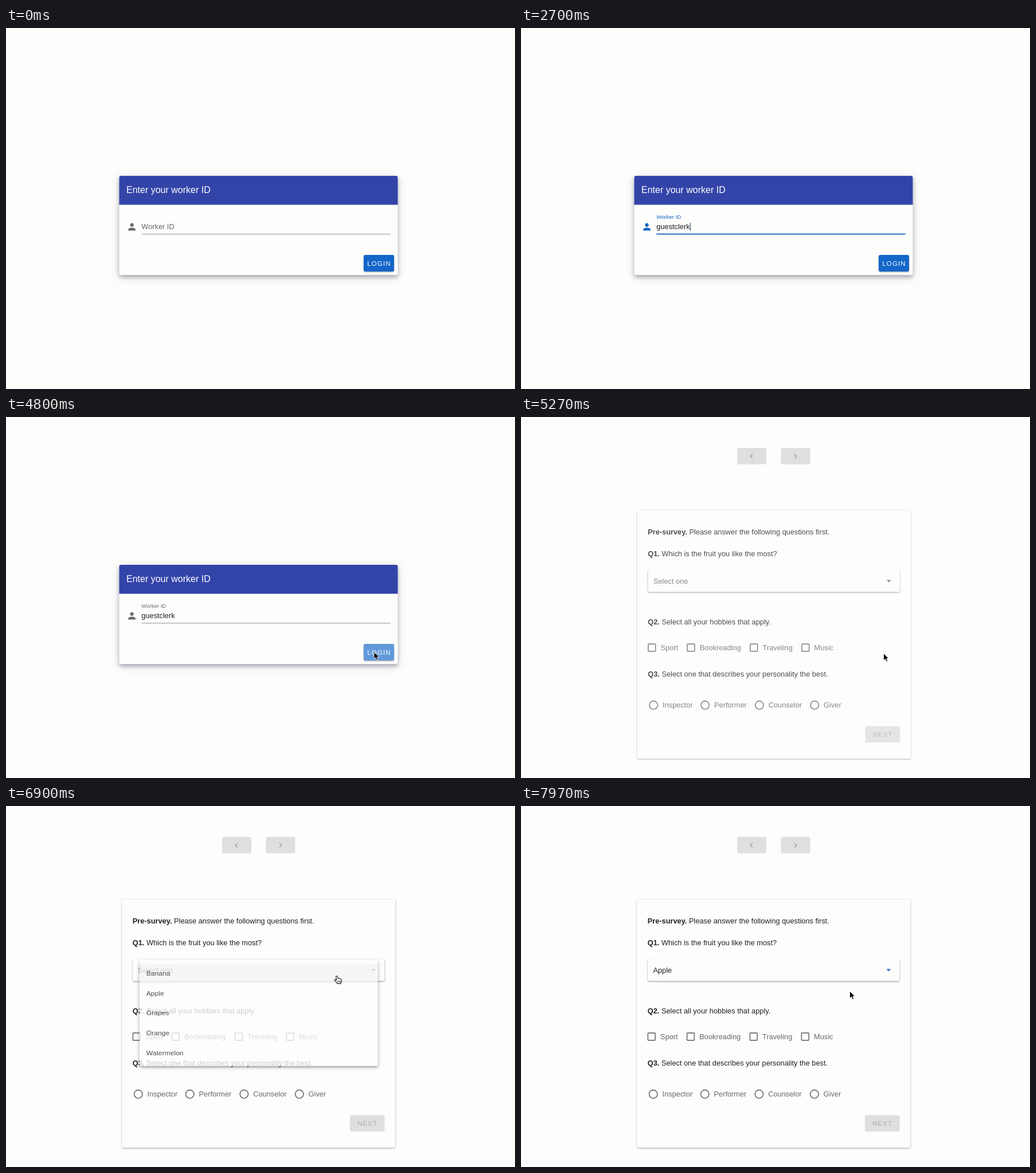
Recreate the animation shown at these times as an HTML page. Size 888 px wide and 630 px high, loop 8000 ms.

```html
<!DOCTYPE html>
<html lang="en">
<head>
<meta charset="utf-8">
<title>Worker login and pre-survey</title>
<style>
html, body { margin: 0; width: 100%; height: 100%; overflow: hidden; background: #fdfdfc; }
svg { display: block; width: 888px; height: 630px; font: 12.8px "Liberation Sans", Arial, sans-serif; fill: #212121; }
b, .bold { font-weight: bold; }
.paper { fill: #fdfdfc; }
.high { filter: drop-shadow(0 4px 3px rgba(20,20,50,.25)) drop-shadow(0 3px 7px rgba(20,20,50,.17)); }
.low { filter: drop-shadow(0 1px .8px rgba(0,0,0,.33)) drop-shadow(0 0 .6px rgba(0,0,0,.14)); }
.field { filter: drop-shadow(0 1.3px .9px rgba(0,0,0,.38)) drop-shadow(0 0 .7px rgba(0,0,0,.18)); }
.menu { filter: drop-shadow(0 3px 2px rgba(0,0,0,.3)) drop-shadow(0 2px 4px rgba(0,0,0,.2)); }
.button { font-size: 11.5px; letter-spacing: 1.1px; text-anchor: middle; }
.muted { fill: #686868; }
.outline { fill: none; stroke: #6c6c6c; stroke-width: 1.6; }
</style>
</head>
<body>
<svg viewBox="0 0 888 630">
  <defs><clipPath id="buttonClip"><rect x="624" y="396" width="53" height="29" rx="3"/></clipPath></defs>

  <g id="login">
    <rect class="paper high" x="197.5" y="258" width="486" height="173" rx="3"/>
    <path fill="#3344a9" d="M197.5 308.5V261q0-3 3-3h480q3 0 3 3v47.5z"/>
    <text x="210" y="288" font-size="16" fill="#fff">Enter your worker ID</text>
    <path id="person" transform="translate(210 337.4) scale(.8)" d="M12 12c2.2 0 4-1.8 4-4s-1.8-4-4-4-4 1.8-4 4 1.8 4 4 4zm0 2c-2.7 0-8 1.3-8 4v2h16v-2c0-2.7-5.3-4-8-4z"/>
    <text id="label">Worker ID</text>
    <text id="value" x="236.3" y="351"></text>
    <rect id="caret" y="340" width="1" height="14" fill="#26415f"/>
    <rect x="236.3" y="359.3" width="434.4" height="1" fill="#929292"/>
    <rect id="focusLine" y="358.7" height="1.7" fill="#1565c0"/>
    <rect x="624" y="396" width="53" height="29" rx="3" fill="#1466c8" style="filter:drop-shadow(0 1.5px 1.2px rgba(0,0,0,.35))"/>
    <text class="button" x="651" y="414.6" fill="#fff">LOGIN</text>
    <circle id="ripple" cx="642" cy="410" fill="#fff" clip-path="url(#buttonClip)"/>
  </g>

  <g id="nav">
    <rect x="377" y="54" width="51" height="28.5" rx="3" fill="#dfdfde"/>
    <rect x="453.5" y="54" width="51" height="28.5" rx="3" fill="#dfdfde"/>
    <path d="M404 64.6l-3.8 3.8 3.8 3.8M477 64.6l3.8 3.8-3.8 3.8" fill="none" stroke="#a2a2a2" stroke-width="1.5"/>
  </g>

  <g id="survey">
    <rect class="paper low" x="202" y="162.5" width="477.5" height="434" rx="3"/>
    <g id="questions"></g>
    <rect class="paper field" x="221" y="267" width="439.5" height="38.5" rx="3"/>
    <text id="choice" x="230.4" y="291"></text>
    <path id="dropArrow" d="M637.4 284.6h8l-4 4z"/>
    <g id="options" class="muted"></g>
    <rect x="600" y="539.5" width="60.5" height="28.5" rx="3" fill="#dfdfde"/>
    <text class="button" x="630.7" y="557.6" fill="#adadad">NEXT</text>
  </g>

  <g id="menu">
    <rect class="paper menu" x="221.2" y="267" width="439.2" height="204" rx="3"/>
    <rect id="hover" x="221.2" width="439.2" height="38.3" fill="#f3f3f1"/>
    <g id="fruits"></g>
  </g>

  <g id="pointer" stroke-linejoin="round">
    <path id="arrow" d="M0 0V12.6L2.9 9.9L4.9 14.4L7.1 13.4L5.2 9.1H9.1Z" fill="#000" stroke="#fff" stroke-width=".9"/>
    <path id="hand" d="M-1.4 1.2Q0-.8 1.4 1.2L2.3 4.8Q3.8 4 4.6 5.2Q6 4.6 6.8 5.8Q8.5 5.5 8.5 7.5L7.9 10.8L7 13.4H1L-1.5 10L-4 7.4Q-3.7 5.6-1.8 6.6L-.3 7.6ZM2.3 8.4v2.6M4.3 8.4v2.6M6.2 8.4v2.6" fill="#fff" stroke="#111" stroke-width="1.1"/>
  </g>
</svg>

<script>
const LOOP = 8000;
const WORKER = "guestclerk";
const ROW = 38.2, MENU_TOP = 273.4;
const FOCUS = 350, TYPE_START = 950, TYPE_STEP = 130;
const CLICK = 4450, PAGE = 5030, OPEN = 6800, PICK = 7560;

const $ = id => document.getElementById(id);
const set = (id, attrs) => {
  for (const name in attrs) $(id).setAttribute(name, attrs[name]);
};
const show = (id, on) => set(id, { visibility: on ? "visible" : "hidden" });
const lerp = (a, b, k) => a + (b - a) * k;
const ramp = (t, start, length) => Math.min(1, Math.max(0, (t - start) / length));
const ease = k => k * k * (3 - 2 * k);
const decelerate = k => 1 - (1 - k) ** 3;

// Static survey content
$("questions").innerHTML = [
  ["Pre-survey.", "Please answer the following questions first.", 204.6],
  ["Q1.", "Which is the fruit you like the most?", 242.6],
  ["Q2.", "Select all your hobbies that apply.", 361.8],
  ["Q3.", "Select one that describes your personality the best.", 452.6]
].map(([head, body, y]) => `<text x="220.7" y="${y}"><tspan class="bold">${head}</tspan> ${body}</text>`).join("");

const checks = [["Sport", 227.8], ["Bookreading", 296], ["Traveling", 405.8], ["Music", 495.8]];
const radios = [["Inspector", 230.8], ["Performer", 320.7], ["Counselor", 415.4], ["Giver", 511.8]];
$("options").innerHTML =
  checks.map(([name, x]) => `<rect class="outline" x="${x - 6.4}" y="396.1" width="12.8" height="12.8" rx="1"/>
    <text x="${x + 15.3}" y="407">${name}</text>`).join("") +
  radios.map(([name, x]) => `<circle class="outline" cx="${x}" cy="502.8" r="7.2"/>
    <text x="${x + 15.8}" y="507.3">${name}</text>`).join("");

$("fruits").innerHTML = ["Banana", "Apple", "Grapes", "Orange", "Watermelon"]
  .map((name, i) => `<text x="233.8" y="${297 + i * ROW}">${name}</text>`).join("");

// Pointer stops: time, x, y
const stops = [
  [3000, 755, 424], [3420, 755, 424], [4100, 645, 411], [4400, 642, 410], [4900, 642, 410],
  [5270, 632.5, 412.5], [5700, 632, 411], [6400, 577, 296.5], [6950, 577, 296.5],
  [7300, 574, 324], [7600, 573.5, 323], [8000, 573.5, 323]
];

function pointerAt(t) {
  const i = Math.max(1, stops.findIndex(stop => stop[0] > t));
  const [start, x0, y0] = stops[i - 1], [end, x1, y1] = stops[i];
  const k = ease(ramp(t, start, end - start));
  return [lerp(x0, x1, k), lerp(y0, y1, k)];
}

function drawLogin(t) {
  const focused = t >= FOCUS && t < CLICK;
  const lift = decelerate(ramp(t, FOCUS, 200));
  const typed = Math.max(0, Math.min(WORKER.length, Math.floor((t - TYPE_START) / TYPE_STEP) + 1));
  set("label", {
    transform: `translate(236.3 ${lerp(351, 333.4, lift)}) scale(${lerp(1, .75, lift)})`,
    fill: focused ? "#1565c0" : "#686868"
  });
  set("person", { fill: focused ? "#1565c0" : "#6b6b6f" });
  $("value").textContent = WORKER.slice(0, typed);

  const line = focused ? lift : 1;
  set("focusLine", {
    x: 453.5 - 217.2 * line, width: 434.4 * line,
    opacity: t < FOCUS ? 0 : 1 - ramp(t, CLICK, 200)
  });
  const typing = t > TYPE_START && t < TYPE_START + TYPE_STEP * WORKER.length;
  set("caret", { x: 236.6 + (typed ? $("value").getComputedTextLength() : 0) });
  show("caret", focused && t < PAGE && (typing || (t - 2250 + 5000) % 1000 < 500));
  set("ripple", {
    r: 42 * decelerate(ramp(t, CLICK, 300)),
    opacity: .33 * (1 - ramp(t, 4850, 180))
  });
}

function drawSurvey(t) {
  set("survey", {
    opacity: ease(ramp(t, 5060, 300)),
    transform: `translate(${t < 5400 ? .5 : 0} 0)`
  });
  const picked = t >= PICK;
  $("choice").textContent = picked ? "Apple" : "Select one";
  set("choice", { y: picked ? 290.6 : 291, fill: picked ? "#212121" : "#6c6c6c" });
  set("dropArrow", { fill: picked ? "#1f66d0" : "#707070" });
}

function drawMenu(t, pointerY) {
  const grow = decelerate(ramp(t, OPEN, 250));
  const opacity = grow * (1 - ramp(t, PICK, 220));
  const sx = lerp(.75, 1, grow), sy = lerp(.56, 1, grow);
  const row = Math.max(0, Math.floor((pointerY - MENU_TOP) / ROW));
  set("menu", { opacity, transform: `translate(441 286) scale(${sx} ${sy}) translate(-441 -286)` });
  set("hover", { y: MENU_TOP + row * ROW });
  show("menu", opacity > 0);
}

function draw(t) {
  const [x, y] = pointerAt(t);
  const hand = t > PAGE && t < 7620 && y < 334;
  const loginVisible = t < PAGE;
  set("login", { display: loginVisible ? "inline" : "none" });
  set("nav", { display: loginVisible ? "none" : "inline" });
  drawLogin(t);
  drawSurvey(t);
  drawMenu(t, y);
  set("pointer", { transform: `translate(${x} ${y})` });
  show("arrow", t >= 3000 && !hand);
  show("hand", hand);
}

const begin = performance.now();
function tick() {
  draw((performance.now() - begin) % LOOP);
  requestAnimationFrame(tick);
}
tick();
</script>
</body>
</html>
```
